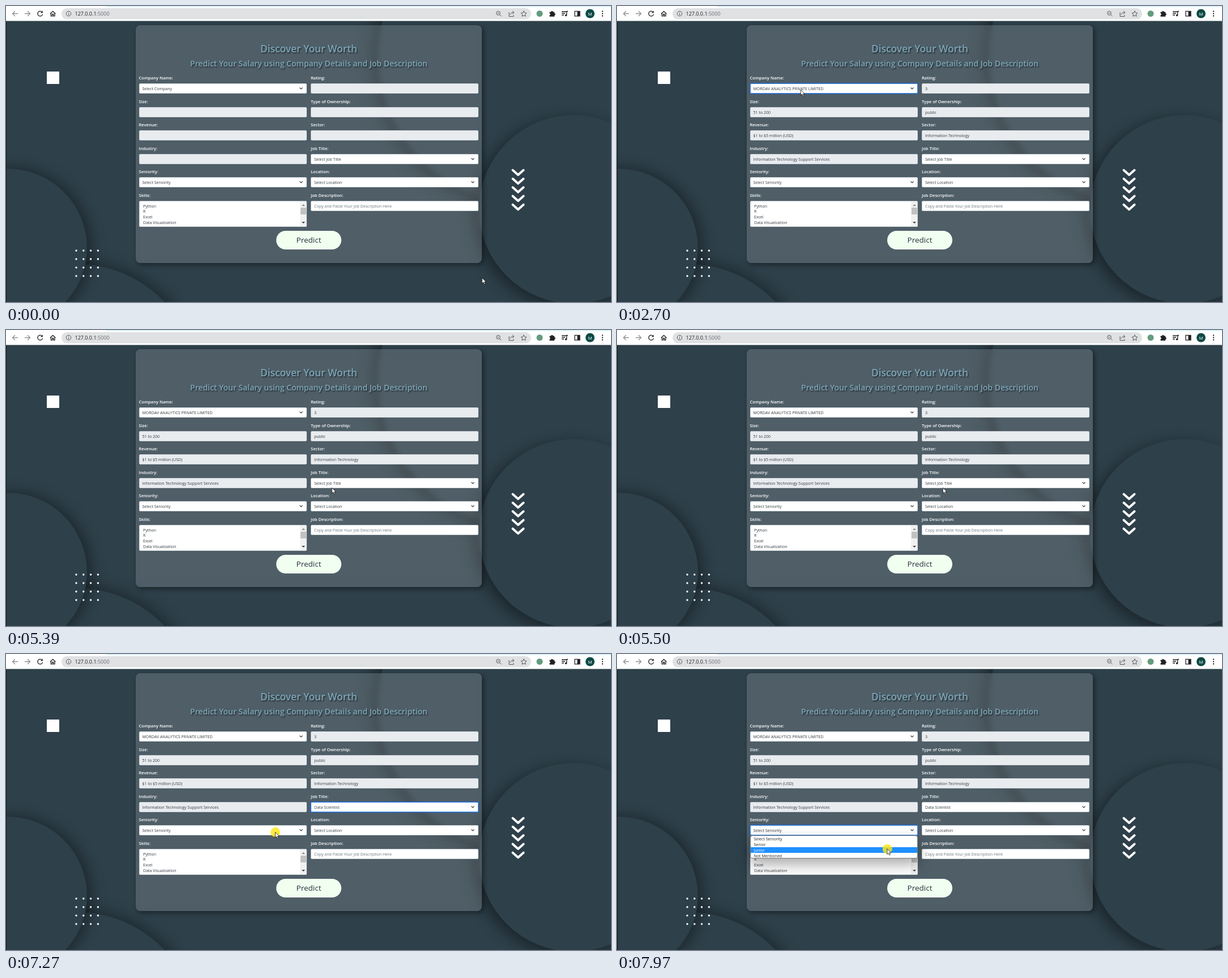
An HTML page for the animation above (8000 ms loop, 1068x524 px).

```html
<!DOCTYPE html>
<html lang="en">
<head>
<meta charset="utf-8">
<title>Discover Your Worth</title>
<style>
html, body { margin: 0; width: 1068px; height: 524px; overflow: hidden; background: #2e404a; }
body { position: relative; font: 7.05px "Open Sans", "Noto Sans", sans-serif; color: #333a40; white-space: nowrap; }
div, span, i, svg { position: absolute; box-sizing: border-box; }
svg { left: 0; top: 0; }

.step { animation: 8s step-end infinite; }
#form { inset: 0; animation-name: form; }
#card { left: 229px; top: 34px; width: 611px; height: 421px; border-radius: 8px;
  background: rgba(255, 255, 255, .16); backdrop-filter: blur(5px); box-shadow: 3px 3px 9px rgba(0, 0, 0, .45); }
.head { left: 229px; width: 611px; text-align: center; line-height: 30px; font-weight: 600;
  color: #7ba4b6; text-shadow: 1.5px 1.5px 2px rgba(0, 0, 0, .5); }
.label { font-size: 7.55px; font-weight: 600; color: #fff; line-height: 16px; }
.field { width: 296px; height: 18px; border: 1px solid #ced4da; border-radius: 2px; background: #fff; }
.field.fixed { background: #e9ecef; }
.field span { left: 5px; top: 0; line-height: 16px; }
.field .hint { color: #6c757d; }
.field svg { left: 281px; top: 5px; }
.ring { inset: -1px; border: 1px solid #3682ee; border-radius: 2px; box-shadow: 0 0 0 1.3px rgba(13, 110, 253, .35); }
.after, .ring, .popup { opacity: 0; }
#skills { left: 235px; top: 345px; width: 296px; height: 46px; overflow: hidden;
  border: 1px solid #ced4da; border-radius: 2px; background: #fff; }
#skills span { left: 6px; line-height: 10px; }
.bar { right: 0; top: 0; bottom: 0; width: 11px; background: #f1f1f1; }
.bar i { left: .5px; top: 11px; width: 10px; height: 12px; background: #c1c1c1; }
.bar::before, .bar::after { content: ""; position: absolute; left: 2.5px; border: 3px solid transparent; }
.bar::before { top: 2px; border-bottom-color: #8a8a8a; }
.bar::after { bottom: 2px; border-top-color: #404040; }
#go { left: 477px; top: 398px; width: 115px; height: 33px; border-radius: 17px; background: #f0fff0;
  color: #26323a; font-size: 13.5px; line-height: 32px; text-align: center; }

.popup { width: 296px; overflow: hidden; border: .5px solid #777; border-radius: 4px; background: #fff;
  box-shadow: 0 10px 24px rgba(0, 0, 0, .35); color: #222; }
.popup .rows { left: 0; top: .5px; width: 100%; }
.popup .rows div { position: static; padding-left: 6px; height: 10px; line-height: 10px; }
#co-rows { animation-name: co-scroll; }

#cursor { left: 0; top: 0; animation: cursor 8s ease-in-out infinite; }
#press { left: -8.5px; top: -8.5px; width: 17px; height: 17px; border-radius: 50%;
  background: rgba(255, 229, 25, .82); opacity: 0; animation-name: press; }

@keyframes form {
  0%, 74.375%, 93.625% { visibility: visible }
  73.125%, 92.625% { visibility: hidden }
}
@keyframes co-ring { 0%, 67.375% { opacity: 0 } 10.5% { opacity: 1 } }
@keyframes co-list { 0%, 32.625% { opacity: 0 } 10.5% { opacity: 1 } }
@keyframes co-before { 0% { opacity: 1 } 27.875%, to { opacity: 0 } }
@keyframes co-after { 0% { opacity: 0 } 27.875%, to { opacity: 1 } }
@keyframes co-scroll {
  0% { transform: none }
  14.25% { transform: translateY(-80px) }
  27.875% { transform: translateY(-130px) }
  28.5%, to { transform: translateY(-160px) }
}
@keyframes co-first { 0% { background: #1e90ff; color: #fff } 14.25%, to { background: none; color: #222 } }
@keyframes co-pick { 0% { background: none; color: #222 } 27.875%, to { background: #1e90ff; color: #fff } }
@keyframes filled { 0% { opacity: 0 } 33.75%, to { opacity: 1 } }
@keyframes job-ring { 0%, 92.625% { opacity: 0 } 73.125% { opacity: 1 } }
@keyframes job-list { 0%, 80.625% { opacity: 0 } 73.125% { opacity: 1 } }
@keyframes job-before { 0% { opacity: 1 } 80.625%, to { opacity: 0 } }
@keyframes job-after { 0% { opacity: 0 } 80.625%, to { opacity: 1 } }
@keyframes job-first { 0% { background: #1e90ff; color: #fff } 77.625%, to { background: none; color: #222 } }
@keyframes job-pick { 0% { background: none; color: #222 } 77.625%, to { background: #1e90ff; color: #fff } }
@keyframes sen-ring { 0% { opacity: 0 } 93.625%, to { opacity: 1 } }
@keyframes sen-list { 0% { opacity: 0 } 92.625%, to { opacity: 1 } }
@keyframes sen-first { 0% { background: #1e90ff; color: #fff } 94.5%, to { background: none; color: #222 } }
@keyframes sen-over { 0%, 95% { background: none; color: #222 } 94.5% { background: #1e90ff; color: #fff } }
@keyframes sen-pick { 0% { background: none; color: #222 } 95%, to { background: #1e90ff; color: #fff } }
@keyframes press {
  0%, 10.5%, 72.5%, 80.625%, 92% { opacity: 0 }
  9.25%, 70.75%, 78.75%, 89.875%, 98.375%, to { opacity: 1 }
}
@keyframes cursor {
  0%, .375% { transform: translate(840px, 481px) }
  7.5% { transform: translate(331px, 109px) }
  9.25%, 30.7% { transform: translate(324px, 144px) }
  30.75%, 46.375% { transform: translate(324px, 148px) }
  53%, 55.3% { transform: translate(547px, 260px) }
  55.875% { transform: translate(535.5px, 261px) }
  57.625%, 59.5% { transform: translate(558px, 250px) }
  62.5% { transform: translate(563px, 232px) }
  65.375%, 68.75% { transform: translate(575px, 279px) }
  70.625%, 75% { transform: translate(575px, 272px) }
  77.625%, 80.625% { transform: translate(574px, 295px) }
  86.625%, 88.75% { transform: translate(473px, 315px) }
  89.875%, 91% { transform: translate(475px, 315px) }
  92.5%, 93.625% { transform: translate(476.5px, 315.5px) }
  95.5%, to { transform: translate(476.5px, 344.5px) }
}
</style>
</head>
<body>
<svg width="1068" height="524" fill="#2e404a">
  <circle cx="919" cy="88" r="262" style="filter:drop-shadow(-8px 6px 16px rgba(0,0,0,.42))"/>
  <circle cx="1002" cy="360" r="167" style="filter:drop-shadow(-9px 7px 13px rgba(0,0,0,.42))"/>
  <circle cx="125" cy="670" r="213" style="filter:drop-shadow(6px -2px 14px rgba(0,0,0,.4))"/>
  <circle cx="3" cy="428" r="140" style="filter:drop-shadow(7px 0 13px rgba(0,0,0,.42))"/>
  <path d="M0 27h1v497h-1z" fill="#0d1114"/>
  <path d="M72 116h22v22h-22z" fill="#fff"/>
  <g id="marks" fill="#fff"></g>
</svg>

<svg width="1068" height="27" fill="none" stroke="#202124" stroke-width="1.3">
  <g stroke="none">
    <path d="M0 0h1068v26.5h-1068z" fill="#fff"/>
    <path d="M177 0h891v1h-891z" fill="#b5ebf4"/>
    <rect x="98" y="4" width="829" height="19.5" rx="9.75" fill="#dfe1e3"/>
    <circle cx="942" cy="13.5" r="5.5" fill="#649b7e"/>
    <path d="M959.5 10.5h2.7a1.7 1.7 0 0 1 3.4 0h2.6v2.6a1.7 1.7 0 0 1 0 3.4v2.2h-8.7v-2.4a1.7 1.7 0 0 0 0-3.3z" fill="#202124"/>
    <path d="M1008.500 9h4.500v9h-4.500z" fill="#202124"/>
    <circle cx="1031" cy="13.500" r="8" fill="#0d4a46"/>
    <g fill="#202124">
      <circle cx="1053" cy="9.500" r="1.150"/><circle cx="1053" cy="13.500" r="1.150"/><circle cx="1053" cy="17.500" r="1.150"/>
      <circle cx="988.500" cy="16.500" r="1.700"/><path d="M64.800 8.300v4h-4z"/>
    </g>
    <text x="121.500" y="17" font-size="9" fill="#202124">127.0.0.1<tspan fill="#6a6e72">:5000</tspan></text>
    <text x="1031" y="16.500" font-size="8" text-anchor="middle" fill="#fff">M</text>
  </g>
  <path d="M21 13.500h-9.500M16 9l-4.500 4.500 4.500 4.500M33 13.500h9.500M38 9l4.500 4.500-4.500 4.500" stroke="#8d9093"/>
  <path d="M63.600 10.600a4.400 4.400 0 1 0 1 4M78 13.700l4.700-4.300 4.700 4.300M79.400 12.500v5.300h2.300v-3.300h2v3.300h2.300v-5.300"/>
  <path d="M981 10h8M981 13h6M981 16h4M989.700 16.500v-7h2.300M1004 9.300h9v8.500h-9z"/>
  <g stroke="#55585c" stroke-width="1">
    <circle cx="110.500" cy="13.500" r="4.200"/><path d="M110.500 13v3M110.500 11v1"/>
    <circle cx="869" cy="12.700" r="3.400"/><path d="M871.500 15.300l3 3M867.300 12.700h3.400"/>
    <path d="M888 11v7.500h8v-2.500M890 15.500c.5-3 3-4 6-4M894 8.700l3 2.800-3 2.800"/>
    <path d="M914 8.700l1.500 3.300 3.500.4-2.600 2.400.7 3.500-3.100-1.800-3.100 1.800.7-3.500-2.600-2.400 3.500-.4z"/>
  </g>
</svg>

<div id="form" class="step">
  <div id="card"></div>
  <div class="head" style="top:60px;font-size:17.35px">Discover Your Worth</div>
  <div class="head" style="top:87px;font-size:13.95px">Predict Your Salary using Company Details and Job Description</div>
  <div id="skills"><div class="bar"><i></i></div></div>
  <div id="go">Predict</div>
</div>
<div id="popups"></div>
<div id="cursor">
  <div id="press" class="step"></div>
  <svg width="10" height="14" style="overflow:visible"><path d="M.3.300v9.800l2.300-2.100 1.600 3.600 1.700-.7-1.600-3.500h3.200z" fill="#fff" stroke="#111" stroke-width=".8"/></svg>
</div>

<script>
const form = document.getElementById('form');
const put = (parent, html) => parent.insertAdjacentHTML('beforeend', html);
const step = (cls, name, text = '') =>
  `<span class="${cls} step" style="animation-name:${name}">${text}</span>`;

const company = 'MORDAV ANALYTICS PRIVATE LIMITED';
const chevron = '<svg width="8" height="6" fill="none" stroke="#343a40" stroke-width="1.1"><path d="M1.500 1.500l2.500 2.500 2.500-2.500"/></svg>';

// label, kind, text shown first, text shown later, key of a select
const fields = [
  ['Company Name', 'select', 'Select Company', company, 'co'],
  ['Rating', 'fixed', '', '3'],
  ['Size', 'fixed', '', '51 to 200'],
  ['Type of Ownership', 'fixed', '', 'public'],
  ['Revenue', 'fixed', '', '$1 to $5 million (USD)'],
  ['Sector', 'fixed', '', 'Information Technology'],
  ['Industry', 'fixed', '', 'Information Technology Support Services'],
  ['Job Title', 'select', 'Select Job Title', 'Data Scientist', 'job'],
  ['Seniority', 'select', 'Select Seniority', '', 'sen'],
  ['Location', 'select', 'Select Location'],
  ['Skills', 'list'],
  ['Job Description', 'input', 'Copy and Paste Your Job Description Here']
];

fields.forEach(([label, kind, before, after, key], i) => {
  const x = i % 2 ? 538 : 234.5;
  const drop = 41.5 * (i >> 1);
  put(form, `<div class="label" style="left:${x}px;top:${Math.round(119 + drop)}px">${label}:</div>`);
  if (kind === 'list') return;
  let inner = '';
  if (key) inner += `<i class="ring step" style="animation-name:${key}-ring"></i>`;
  if (kind === 'select') inner += chevron;
  if (before) inner += after ? step('before', key + '-before', before)
    : `<span class="${kind === 'input' ? 'hint' : ''}">${before}</span>`;
  if (after) inner += step('after', key ? key + '-after' : 'filled', after);
  put(form, `<div class="field ${kind}" style="left:${x}px;top:${Math.round(137 + drop)}px">${inner}</div>`);
});

['Python', 'R', 'Excel', 'Data Visualization', 'Machine Learning'].forEach((name, i) =>
  put(document.getElementById('skills'), `<span style="top:${2.500 + 9.800 * i}px">${name}</span>`));

function popup(key, x, y, height, rows, marks, bar = '') {
  const lines = rows.map((row, i) =>
    `<div class="step" style="animation-name:${marks[i] ? key + '-' + marks[i] : 'none'}">${row}</div>`);
  put(document.getElementById('popups'),
    `<div class="popup step" style="left:${x}px;top:${y}px;height:${height}px;animation-name:${key}-list">
      <div id="${key}-rows" class="rows step">${lines.join('')}</div>${bar}</div>`);
}

const heads = ['ADRUNO', 'CELVACT', 'FENDRIK', 'HOLUMBRA', 'JUNTIVO', 'MORDAV', 'PELTRUX', 'SARVOLE', 'TUMBRIC', 'ZELQUAN'];
const tails = ['ANALYTICS', 'CONSULTING', 'RESOURCES', 'SYSTEMS'];
const names = heads.flatMap(head => tails.map(tail => `${head} ${tail} PRIVATE LIMITED`));
const companies = ['Select Company', ...names];
popup('co', 234.5, 155, 201, companies, { 0: 'first', [companies.indexOf(company)]: 'pick' },
  '<div class="bar"><i></i></div>');
popup('job', 538, 279.5, 41.5, ['Select Job Title', 'Data Scientist', 'Data Analyst', 'Data Engineer'], ['first', 'pick']);
popup('sen', 234.5, 320.5, 41.5, ['Select Seniority', 'Senior', 'Junior', 'Not Mentioned'], ['first', 'over', 'pick']);

let marks = '';
for (let i = 0; i < 16; i++)
  marks += `<circle cx="${124 + 12.800 * (i % 4)}" cy="${433 + 15 * (i >> 2)}" r="1.700"/>`;
for (let i = 0; i < 5; i++)
  marks += `<path d="M894.500 ${290.500 + 15.300 * i}l9.500 8.500 9.500-8.500" fill="none" stroke="#fff" stroke-width="4" stroke-linecap="round" stroke-linejoin="round"/>`;
document.getElementById('marks').innerHTML = marks;
</script>
</body>
</html>
```
